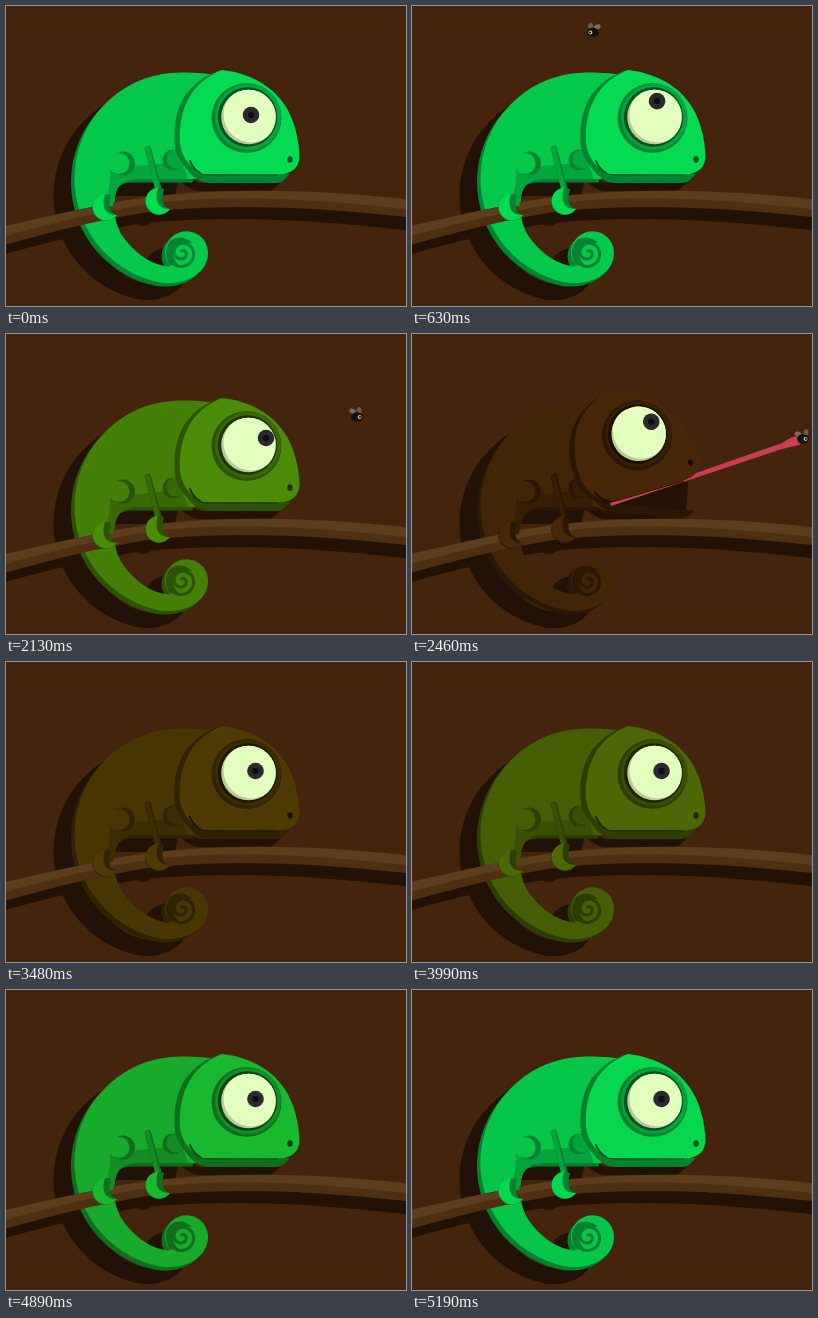
These frames come from a looping animation (400 by 300 pixels, 5220 ms). An HTML page:

```html
<!DOCTYPE html>
<html lang="en">
<head>
<meta charset="utf-8">
<title>Chameleon and fly</title>
<style>
html, body { margin: 0; width: 100%; height: 100%; overflow: hidden; background: #45240e; }
svg { display: block; width: 100vw; height: 100vh; }
.main { fill: var(--main); }
.skin { fill: var(--skin); }
.mid { fill: var(--mid); }
.dark { fill: var(--dark); }
.deep { fill: var(--deep); }
.line { fill: none; stroke: var(--dark); stroke-linecap: round; stroke-linejoin: round; }
.shade { fill: #221106; }
</style>
</head>
<body>
<svg id="stage" viewBox="0 0 400 300">
  <defs>
    <path id="body" d="M212 69Q195 66 176 66.5A106 106 0 0 0 154 276.5C178 280 202 268 202 247A21.5 21.5 0 1 0 164 260.5C146 260 126 246 114 226Q106 210 109 190Q112 174 128 173H190Z"/>
    <path id="head" d="M216 64Q194 73 184 90C175 105 173 122 174 138Q177 156 192 166Q196 168.5 204 168.5L274 168.5Q293 167 293.5 150C293 133 288 112 278 98C265 79 243 67 216 64Z"/>
    <path id="jaw" d="M172 140Q176 164 192 174Q197 177 204 177H270Q275 177 278 174L284 168L204 169Q190 167 180 150Z"/>
    <path id="branch" d="M-5 221Q60 206 110 196C200 180 310 182 425 196V214C320 201 230 197 150 205Q90 213 -5 240Z"/>
    <clipPath id="ball"><circle cx="242.5" cy="111" r="27.3"/></clipPath>
  </defs>

  <g class="shade">
    <use href="#branch" x="-10" y="12"/>
    <use href="#body" x="-21" y="17"/>
    <use href="#jaw" x="-9" y="8"/>
    <circle cx="137" cy="208" r="12"/>
  </g>

  <use href="#body" class="dark" x="-3.5" y="3.5"/>
  <use href="#body" class="skin"/>
  <path class="dark" d="M163 259Q156 244 165 234Q176 228 186 237Q168 235 167 247Q167 256 176 261Z"/>
  <path id="curl" class="line" stroke-width="3"/>

  <use href="#branch" fill="#4e2f11"/>
  <path d="M-5 221Q60 206 110 196C200 180 310 182 425 196V206C310 192 220 188 150 197Q90 205 -5 231Z" fill="#5c3d1c"/>

  <!-- legs -->
  <path class="mid" d="M104 160Q118 172 130 160L176 156L182 173H128Q112 174 109 190L107 200H98Q105 182 104 160Z"/>
  <circle class="dark" cx="117" cy="157.5" r="12"/>
  <circle class="skin" cx="113" cy="157.5" r="10.5"/>
  <circle class="dark" cx="167" cy="154" r="10.5"/>
  <circle class="mid" cx="170" cy="153" r="9.5"/>
  <path class="line" stroke-width="6.5" d="M142 143L153 185"/>
  <path d="M141.5 142.5L152 185" fill="none" stroke="var(--mid)" stroke-width="4.5" stroke-linecap="round"/>
  <g id="foot">
    <path class="dark" d="M158 183A13.5 13.5 0 1 0 164 203Q153 201 158 183Z"/>
    <path class="main" d="M152 181.5A13.5 13.5 0 1 0 164 203Q146 203 152 181.5Z"/>
  </g>
  <use href="#foot" x="-53" y="6"/>

  <!-- mouth -->
  <g id="lower">
    <path d="M183 158L275 140V174L200 173Z" fill="#241206"/>
    <use href="#jaw" class="dark"/>
  </g>
  <path id="tongue" fill="#c83e55"/>

  <g id="upper">
    <path class="dark" d="M216 64Q195 69 180 88C169 104 167 124 169 142Q172 155 182 164L194 168Z"/>
    <use href="#head" class="main"/>
    <path d="M184 155Q187 163 194 167" fill="none" stroke="var(--deep)" stroke-width="2" stroke-linecap="round"/>
    <path d="M195 168Q199 169 204 169H272" fill="none" stroke="var(--deep)"/>
    <ellipse class="deep" cx="284" cy="153.5" rx="2.7" ry="3.3"/>
    <circle class="dark" cx="240.5" cy="112" r="35"/>
    <circle class="mid" cx="242" cy="111" r="33"/>
    <circle class="deep" cx="241.5" cy="111" r="29.7"/>
    <g clip-path="url(#ball)">
      <rect x="210" y="80" width="70" height="65" fill="#bccb9c"/>
      <circle cx="245.5" cy="108.5" r="28" fill="#e3ffbe"/>
      <g id="pupil">
        <circle r="8.3" fill="#2c2a2d"/>
        <circle r="3.2" fill="#0d0d12"/>
      </g>
    </g>
  </g>

  <g id="fly">
    <ellipse id="wingA" cx="-5.5" cy="-3" rx="3.6" ry="2.4" fill="#7d6d58"/>
    <ellipse id="wingB" cx="3" cy="-5.5" rx="2.4" ry="3.2" fill="#6a5c49"/>
    <ellipse cy="1" rx="6" ry="4.8" fill="#15110f"/>
    <circle cx="2.5" cy="1" r="2" fill="#c4c1a8"/>
    <circle cx="2.9" cy="1" r="1" fill="#111"/>
  </g>
</svg>
<script>
const LOOP = 5220;
const el = id => document.getElementById(id);
const smooth = u => u * u * (3 - 2 * u);

// Interpolates rows of [time, ...values].
function track(rows, t, ease = u => u) {
  if (t <= rows[0][0]) return rows[0].slice(1);
  for (let i = 1; i < rows.length; i++) {
    const a = rows[i - 1], b = rows[i];
    if (t < b[0]) {
      const u = ease((t - a[0]) / (b[0] - a[0]));
      return a.slice(1).map((v, k) => v + (b[k + 1] - v) * u);
    }
  }
  return rows[rows.length - 1].slice(1);
}

const bright = [4, 218, 82], leaf = [46, 152, 12], moss = [74, 139, 8],
      olive = [78, 59, 3], bark = [72, 39, 8];
const skin = [[0, ...bright], [1650, ...bright], [1980, ...leaf], [2130, ...moss],
  [2300, ...olive], [2430, ...bark], [3300, ...bark], [3480, ...olive],
  [4400, ...moss], [4560, ...leaf], [5220, ...bright]];
const gaze = [[0, 245, 109], [300, 256, 99], [540, 246, 95], [1080, 233.5, 97],
  [1640, 233.5, 97], [2130, 260, 104], [2460, 258, 103], [2700, 258, 103], [3000, 249.5, 109]];
const flight = [[30, 408, 60], [280, 312, 38], [540, 218, 27], [800, 112, 23], [1000, 30, 24],
  [1080, 16, 24], [1160, 18, 25], [1260, 40, 25], [1410, 88, 24], [1620, 164, 28],
  [1800, 231, 40], [1980, 298, 60], [2130, 351, 82], [2430, 391, 104]];
const gape = [[2190, 0], [2390, 1], [2540, 1], [2700, 0]];
const reach = [[2340, 0], [2430, 1], [2490, 1], [2640, 0]];

// Groove of the rolled tail.
let groove = "";
for (let i = 0; i <= 60; i++) {
  const u = i / 60, a = 2 - u * 10, r = 14 - 12 * u;
  groove += (i ? "L" : "M") + (176 + r * Math.cos(a)).toFixed(1) + " " + (247 + r * Math.sin(a)).toFixed(1);
}
el("curl").setAttribute("d", groove);

function drawTongue(u) {
  const x = 198 + 188 * u, y = 170 - 64 * u;
  el("tongue").setAttribute("d", u <= 0 ? "" :
    `M198 169L${x - 16 * u} ${y + 3 * u}Q${x - 5} ${y - 5} ${x + 2} ${y - 4}` +
    `Q${x + 6} ${y + 2} ${x + 1} ${y + 5}L${x - 16 * u} ${y + 9 * u}L199 172Z`);
  return [x + 5, y - 2];
}

function draw(t) {
  const rgb = track(skin, t), root = el("stage").style;
  const tint = k => `rgb(${rgb.map(v => Math.round(v * k))})`;
  root.setProperty("--main", tint(1));
  root.setProperty("--skin", tint(.92));
  root.setProperty("--mid", tint(.76));
  root.setProperty("--dark", tint(.6));
  root.setProperty("--deep", tint(.38));

  const [open] = track(gape, t, smooth), [u] = track(reach, t, smooth);
  el("upper").setAttribute("transform", `rotate(${-16.5 * open} 196 160)`);
  el("lower").setAttribute("transform", `rotate(${5 * open} 186 160)`);
  el("pupil").setAttribute("transform", `translate(${track(gaze, t, smooth)})`);

  const tip = drawTongue(u);
  const [x, y] = t < 2430 ? track(flight, t) : tip;
  const flap = 10 * Math.sin(t / 14);
  el("fly").setAttribute("transform", `translate(${x} ${y}) scale(${t < 1100 ? -1 : 1} 1)`);
  el("fly").setAttribute("visibility", t > 30 && t < 2610 ? "visible" : "hidden");
  el("wingA").setAttribute("transform", `rotate(${15 + flap} -1 -1)`);
  el("wingB").setAttribute("transform", `rotate(${-flap} 1 -1)`);
}

const start = performance.now();
function tick() {
  draw((performance.now() - start) % LOOP);
  requestAnimationFrame(tick);
}
tick();
</script>
</body>
</html>
```
